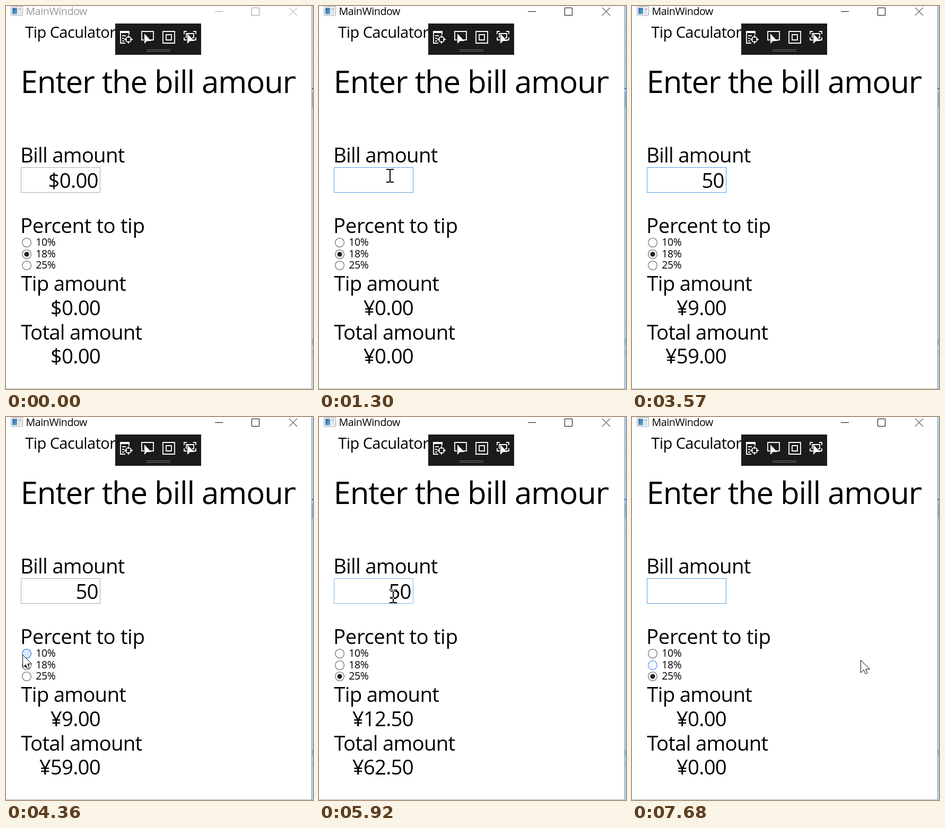
An HTML page for the animation above (8 s loop, 579x722 px).

```html
<!DOCTYPE html>
<html lang="en">
<head>
<meta charset="utf-8">
<title>Tip calculator</title>
<style>
  html, body { margin: 0; width: 100%; height: 100%; overflow: hidden; background: #fff; }
  svg { display: block; width: 579px; height: 722px; }
  text { font-family: "Open Sans", "Noto Sans", sans-serif; letter-spacing: -.02em; white-space: pre; }
  .big { font-size: 38.4px; }
  .end { text-anchor: end; }
  .small { font-size: 19.4px; }
  .line { fill: none; stroke: #fff; stroke-width: 1.8; }
  .ring { stroke-width: 1.3; }
  #ibeam { mix-blend-mode: difference; }
</style>
</head>
<body>
<svg viewBox="0 0 579 722">
  <defs>
    <clipPath id="heading"><path d="M0 100H546V190H0z"/></clipPath>
    <linearGradient id="pane" x2="1" y2="1">
      <stop stop-color="#2f62b0"/><stop offset="1" stop-color="#5fb3c8"/>
    </linearGradient>
  </defs>
  <rect width="579" height="722" fill="#fff"/>

  <!-- strip of the desktop behind the window -->
  <path d="M577 0h2v722h-2z" fill="#cbd5df"/>
  <path d="M577 40h2M577 68h2M577 108h2M577 214h2M577 601h2" stroke="#b4bcc8"/>
  <path d="M577 163h2v29h-2zM577 627h2v12h-2z" fill="#a0aec4"/>
  <path d="M577 154h2v3h-2z" fill="#1579c9"/>
  <path d="M577 652h2M577 657h2" stroke="#8b8f96"/>
  <path d="M0 721.5H577" stroke="#b4b4b4"/>
  <path id="edge" d="M576.5 0V722"/>

  <!-- title bar -->
  <rect x="9.5" y=".5" width="22" height="17.5" rx="1" fill="#f3f4f6" stroke="#a0a4aa"/>
  <rect x="12" y="3.5" width="9" height="12" fill="url(#pane)"/>
  <rect x="23" y="3.5" width="6" height="5" fill="#c9ced4"/>
  <rect x="23" y="10" width="6" height="5.5" fill="#dfe2e6"/>
  <text id="title" x="37.5" y="17.3" style="font-size:19.6px">MainWindow</text>
  <path id="buttons" d="M394 10.5H409M463.5 3.5H477.5V17.5H463.5zM534 3L549 18M549 3L534 18" fill="none"/>

  <text x="36.3" y="60" style="font-size:29px">Tip Caculator</text>

  <!-- debug toolbar -->
  <rect x="206" y="33" width="162" height="59" fill="#1b1b1c"/>
  <g class="line">
    <path d="M215 49H233" stroke-width="4"/>
    <path d="M216 51V70H225M232 51V54M219 56H226M219 61H223M219 66H223"/>
    <circle cx="231" cy="63" r="5.2"/>
    <path d="M231 55V60M231 66V71M223 63H228M234 63H239"/>
    <path d="M260 64H256V48H278V64H272"/>
    <path d="M296 48H318V70H296zM302 54H312V64H302z"/>
    <path d="M336 53V48H341M353 48H358V53M358 59V64H353M341 64H336V59M340 60V52H354V60H351"/>
  </g>
  <path d="M261 52V71L266 66H274zM342 52V71L347 66H355z" fill="#fff"/>
  <path d="M265 82.5H310M265 85.5H310" stroke="#707070"/>

  <!-- form -->
  <text x="27.5" y="164" style="font-size:58.2px" clip-path="url(#heading)">Enter the bill amount</text>
  <text class="big" x="27" y="295">Bill amount</text>
  <rect id="box" x="28.5" y="304.5" width="149" height="47" fill="#fff"/>
  <text class="big end" id="bill" x="173.8" y="342.5"></text>
  <path id="caret" d="M173.5 305V351" stroke="#000"/>
  <text class="big" x="27" y="428" style="letter-spacing:-.01em">Percent to tip</text>
  <g id="radios"></g>
  <text class="big" x="28.3" y="537">Tip amount</text>
  <text class="big end" id="tip" x="178" y="582.5"></text>
  <text class="big" x="28.3" y="628.5">Total amount</text>
  <text class="big end" id="total" x="178" y="673.5"></text>

  <!-- pointer, with the click highlight on top -->
  <path id="arrow" d="M.5 .5V24L6 18.8L9.3 26.3L13 24.7L9.7 17.4H17.3z" fill="#fff" stroke="#000"/>
  <path id="ibeam" d="M-7 -13H-1.5L0 -12L1.5 -13H7V-11H1V11H7V13H1.5L0 12L-1.5 13H-7V11H-1V-11H-7z" fill="#fff"/>
  <circle id="halo" r="18" fill="#ff0" opacity=".55"/>
</svg>
<script>
const LOOP = 8000, TICK = 46;
const $ = id => document.getElementById(id);
const show = (el, on) => el.setAttribute('visibility', on ? 'visible' : 'hidden');
const paint = (el, stroke, fill) => {
  el.setAttribute('stroke', stroke);
  if (fill) el.setAttribute('fill', fill);
};

const rates = [10, 18, 25];
$('radios').innerHTML = rates.map((rate, i) => {
  const y = 446 + Math.round(i * 21.5);
  return `<circle class="ring" cx="39" cy="${y}" r="8.4"/>
    <circle class="dot" cx="39" cy="${y}" r="4.6" fill="#212121"/>
    <text class="small" x="56.3" y="${y + 6.4}">${rate}%</text>`;
}).join('');
const rings = document.querySelectorAll('.ring'), dots = document.querySelectorAll('.dot');

const ringLook = {
  idle: ['#707070', '#fff'],
  hover: ['#5593ff', '#f3f9ff'],
  press: ['#3c77dd', '#d9ecff']
};

// Each entry changes part of the state from its time on.
const events = [
  [0, { active: false, focus: false, caret: false, halo: false, bill: '$0.00', sum: 0,
        sign: '$', pick: 1, hot: -1, look: 'hover' }],
  [600, { halo: true, active: true }],
  [690, { focus: true, bill: '', sign: '¥' }],
  [745, { halo: false }],
  [790, { caret: true }],
  [1300, { caret: false }],
  [1760, { caret: true }],
  [1990, { bill: '5' }],
  [2040, { sum: 5 }],
  [2450, { bill: '50', sum: 50 }],
  [2550, { caret: false }],
  [3060, { caret: true }],
  [3570, { caret: false }],
  [3930, { hot: 0 }],
  [4180, { halo: true, focus: false, look: 'press' }],
  [4310, { halo: false }],
  [4410, { pick: 0, look: 'hover' }],
  [4640, { hot: 1 }],
  [4860, { hot: 2 }],
  [5230, { halo: true, look: 'press' }],
  [5380, { halo: false, pick: 2, look: 'hover' }],
  [5560, { hot: 1 }],
  [5610, { hot: 0 }],
  [5670, { hot: -1 }],
  [6040, { halo: true, focus: true }],
  [6080, { bill: '', sum: 0 }],
  [6120, { caret: true }],
  [6200, { halo: false }],
  [6300, { hot: 1 }],
  [6710, { caret: false }],
  [7220, { caret: true }],
  [7680, { caret: false }]
];

// Pointer stops: time, x, y; null hides it until the next stop.
const stops = [
  [0, null], [50, 330, 690], [560, 134, 320], [1990, null],
  [3390, 134, 320], [3520, 21, 328], [3570, null],
  [3800, 3, 437], [3930, 31, 448], [4500, 31, 448], [4950, 41, 482],
  [5000, 40, 484], [5430, 40, 484], [5900, 140, 338], [5960, 140, 338],
  [6030, 140, 329], [6200, 140, 329], [6300, 85, 460], [6530, 431, 458]
];

function pointerAt(t) {
  const i = stops.findLastIndex(s => s[0] <= t);
  const a = stops[i], b = stops[i + 1];
  if (a[1] === null) return null;
  if (!b || b[1] === null) return { x: a[1], y: a[2] };
  const span = b[0] - a[0];
  const k = Math.floor((t - a[0]) / TICK) * TICK / span;
  return { x: Math.round(a[1] + (b[1] - a[1]) * k), y: Math.round(a[2] + (b[2] - a[2]) * k) };
}

function draw(t) {
  const s = {};
  for (const [at, change] of events) if (at <= t) Object.assign(s, change);
  const p = pointerAt(t);
  const inBox = p && p.x > 28 && p.x < 178 && p.y > 304 && p.y < 352;

  $('title').setAttribute('fill', s.active ? '#000' : '#999');
  paint($('buttons'), s.active ? '#000' : '#999');
  paint($('edge'), s.active ? '#4a9fe3' : '#a8a8a8');
  paint($('box'), s.focus ? '#569de5' : inBox ? '#7eb4ea' : '#abadb3');

  const tip = s.sum * rates[s.pick] / 100;
  $('bill').textContent = s.bill;
  $('tip').textContent = s.sign + tip.toFixed(2);
  $('total').textContent = s.sign + (s.sum + tip).toFixed(2);
  show($('caret'), s.caret);

  rings.forEach((ring, i) => {
    paint(ring, ...ringLook[i === s.hot ? s.look : 'idle']);
    show(dots[i], i === s.pick);
  });

  show($('halo'), p && s.halo);
  show($('arrow'), p && !inBox);
  show($('ibeam'), inBox);
  if (p) for (const id of ['halo', 'arrow', 'ibeam'])
    $(id).setAttribute('transform', `translate(${p.x} ${p.y})`);
}

const start = performance.now();
function frame() {
  draw((performance.now() - start) % LOOP);
  requestAnimationFrame(frame);
}
frame();
</script>
</body>
</html>
```
